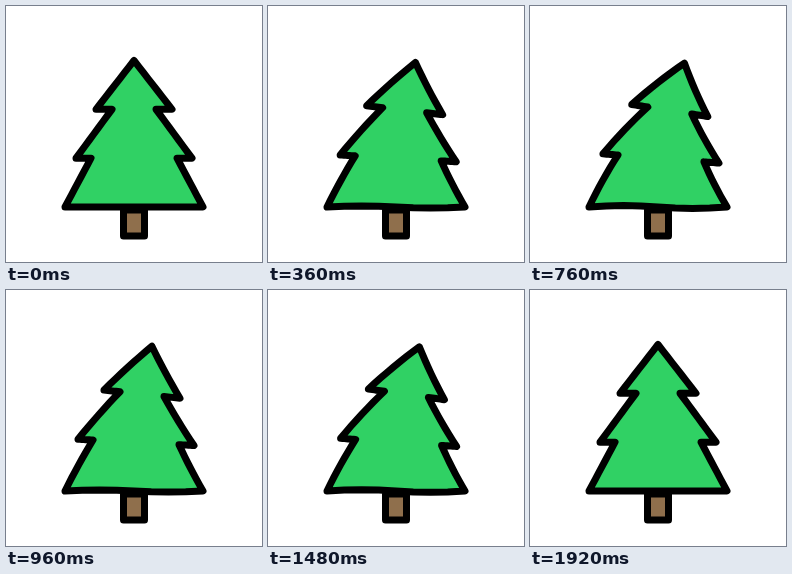
These frames come from a looping animation (256 by 256 pixels, 6 s). An HTML page:

```html
<!DOCTYPE html>
<html lang="en">
<head>
<meta charset="utf-8">
<title>Tree in the wind</title>
<style>
  html, body { margin: 0; width: 100%; height: 100%; overflow: hidden; background: #fff; }
  svg { display: block; width: 100vw; height: 100vh; }
  .line { stroke: #000; stroke-width: 7; stroke-linejoin: round; }
</style>
</head>
<body>
<svg viewBox="0 0 256 256">
  <rect class="line" x="117.5" y="204" width="21" height="26" fill="#8f6f4c"/>
  <path class="line" id="tree" fill="#30d164"/>
</svg>
<script>
const LOOP = 6000, STEP = 40;
const MID = 128, TOP = 54.5, BASE = 201, TIERS = 3, PIECES = 8;

// [time, lean]
const sway = [[0, 0], [600, 1], [1120, 0.48], [1496, 0.78], [1920, 0], [LOOP, 0]];

const tree = document.getElementById("tree");
const ease = p => p * p * (3 - 2 * p);
const mix = (a, b, p) => a + (b - a) * p;

function leanAt(t) {
  const i = sway.findIndex(k => k[0] > t);
  const [t0, a] = sway[i - 1], [t1, b] = sway[i];
  return mix(a, b, ease((t - t0) / (t1 - t0)));
}

// Corners of the upright tree: each tier flares out, then steps in to a notch
function corners() {
  const right = [];
  for (let i = 0; i < TIERS; i++) {
    const y = mix(TOP, BASE, (i + 1) / TIERS);
    right.push([38 + 20 * i - (i === 2 ? 9 : 0), y]);
    if (i < TIERS - 1) right.push([22 + 21 * i, y]);
  }
  const side = s => right.map(([w, y]) => [MID + s * w, y]);
  return [[MID, TOP], ...side(1), ...side(-1).reverse()];
}

// The trunk line bends as a parabola, the tiers tilt with it, the hem ripples
function bend([x, y], u) {
  const h = (BASE - y) / (BASE - TOP);
  const ripple = h < 0.001 ? -1.6 * Math.sin((x - 59) / 138 * 2 * Math.PI) : 0;
  return [
    x + 30 * h * h * u,
    y + (0.27 * h * (x - MID) + 3 * h * h - ripple * -1) * u
  ];
}

const shape = corners();

function outline(u) {
  const pts = shape.flatMap(([x, y], i) => {
    const [nx, ny] = shape[(i + 1) % shape.length];
    return Array.from({ length: PIECES }, (_, k) =>
      bend([mix(x, nx, k / PIECES), mix(y, ny, k / PIECES)], u));
  });
  return "M" + pts.map(p => p.map(n => n.toFixed(2))).join("L") + "Z";
}

const start = performance.now();
function draw(now) {
  const t = Math.max(0, now - start) % LOOP;
  tree.setAttribute("d", outline(leanAt(Math.floor(t / STEP) * STEP)));
  requestAnimationFrame(draw);
}
draw(start);
</script>
</body>
</html>
```
